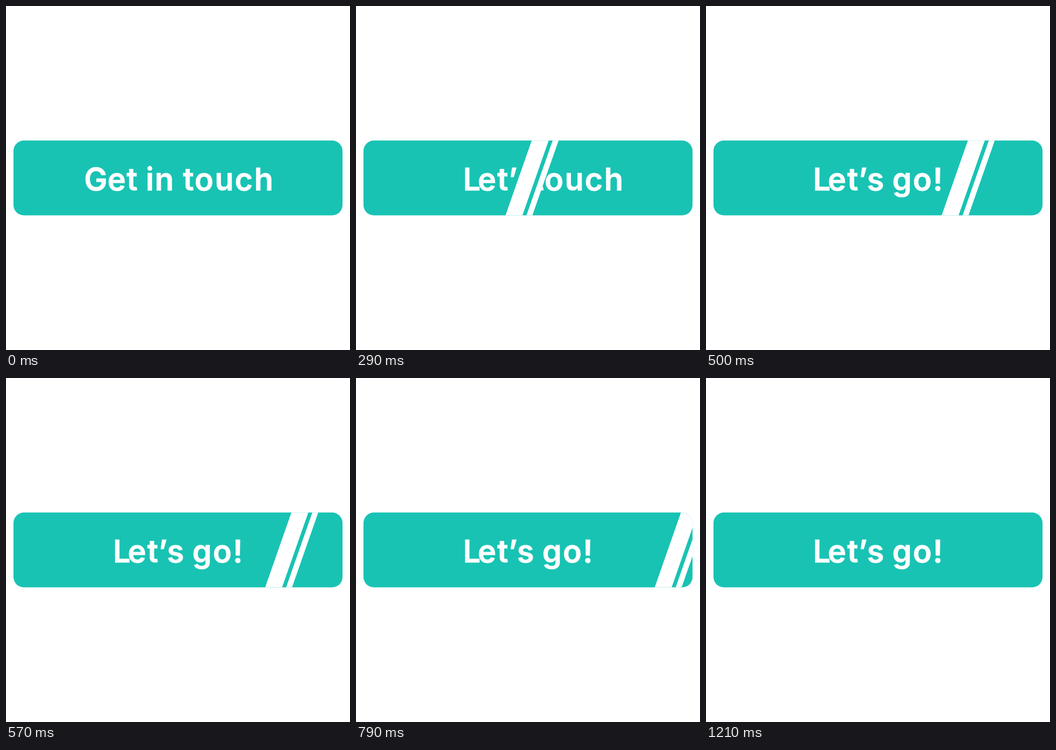
An HTML page that plays this animation: 640x640 px, repeating every 1570 ms.

```html
<!DOCTYPE html>
<html lang="en">
<head>
<meta charset="utf-8">
<title>Button</title>
<style>
  html, body { margin: 0; height: 100%; overflow: hidden; background: #fff; }
  svg { display: block; width: 100%; height: 100%; }
  text {
    font: 600 58px Inter, "Open Sans", sans-serif;
    text-anchor: middle;
    fill: #fff;
    stroke: #fff;
    stroke-width: .8px;
  }
  .teal { fill: #18c3b3; }
  .white { fill: #fff; }
</style>
</head>
<body>
<svg viewBox="0 0 640 640">
  <defs>
    <rect id="shape" x="13.9" y="250.3" width="612.2" height="139.3" rx="19.5"/>
    <clipPath id="button"><use href="#shape"/></clipPath>
    <clipPath id="before"><path class="sweep" d="M50 250H950V390H1Z"/></clipPath>
    <clipPath id="after"><path class="sweep" d="M-900 250H0L-49 390H-900Z"/></clipPath>
  </defs>
  <use href="#shape" class="teal"/>
  <g clip-path="url(#before)">
    <text y="342.8" x="167 206 234.5 251 267.5 294.5 320 339.5 368.5 406 442.5 479.5">Get in touch</text>
  </g>
  <g clip-path="url(#after)">
    <text y="342.8" x="215.3 243.7 273 292 315.5 338 364.7 402.5 431.2">Let’s go!</text>
  </g>
  <g clip-path="url(#button)">
    <path class="sweep white" d="M0 250H31.5L-17.5 390H-49ZM39 250H50L1 390H-10Z"/>
  </g>
</svg>
<script>
const LOOP = 1570, HIDDEN = -200;
// [time in ms, x of the sweep's top left corner]
const path = [[210, 268], [290, 327], [430, 436], [570, 531], [710, 579.5], [930, 641.4], [1210, 672]];
const parts = document.querySelectorAll('.sweep');

// Hold each pose for 70 ms, with 80 ms after 210 and 710.
function poseTime(t) {
  if (t < 290) return 210;
  const start = t < 790 ? 290 : 790;
  const last = t < 790 ? 710 : 1210;
  return Math.min(last, start + 70 * Math.floor((t - start) / 70));
}

function slope(i) {
  const a = path[Math.max(0, i - 1)], b = path[Math.min(path.length - 1, i + 1)];
  return (b[1] - a[1]) / (b[0] - a[0]);
}

// Smooth Hermite curve through the points of the path.
function sweepX(t) {
  let i = 0;
  while (i < path.length - 2 && t >= path[i + 1][0]) i++;
  const [t0, x0] = path[i], [t1, x1] = path[i + 1];
  const d = t1 - t0, u = (t - t0) / d, v = 1 - u;
  return x0 + (x1 - x0) * u * u * (3 - 2 * u) + d * u * v * (v * slope(i) - u * slope(i + 1));
}

function draw(now) {
  const t = now % LOOP;
  const x = t < 210 ? HIDDEN : sweepX(poseTime(t));
  for (const part of parts) part.setAttribute('transform', `translate(${x.toFixed(2)})`);
}

const began = performance.now();
function frame() {
  draw(performance.now() - began);
  requestAnimationFrame(frame);
}
frame();
</script>
</body>
</html>
```
